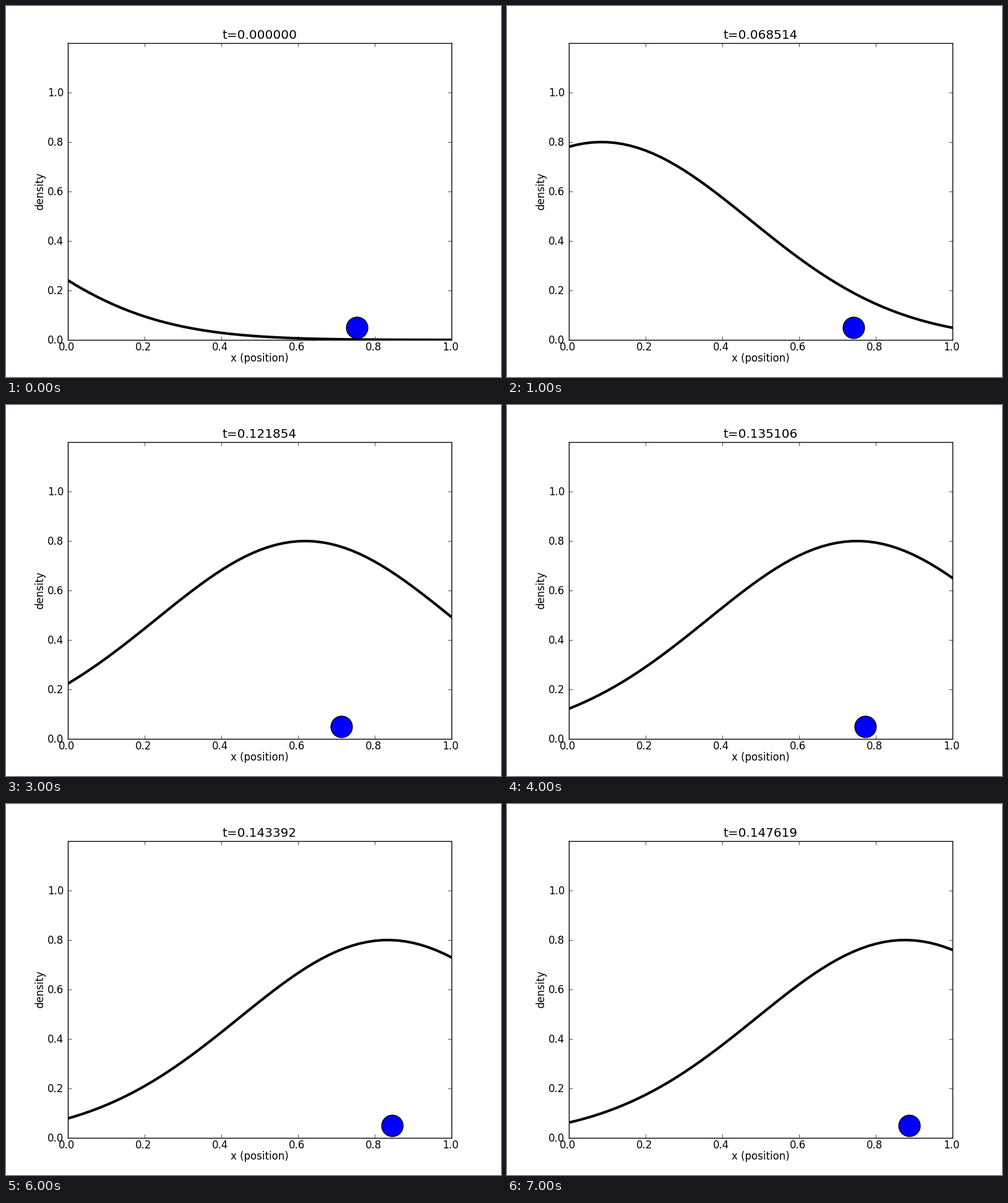
A matplotlib script that plays this animation: 800 by 600 pixels, repeating every 8 s.

```python
import numpy as np
import matplotlib.pyplot as plt
from matplotlib.animation import FuncAnimation

WIDTH, HEIGHT, DPI = 800, 600, 100
LEFT, RIGHT, TOP, BOTTOM = 100, 720, 60, 540
Y_MAX = 1.2

# One (time, ball position) pair per event of the random walk.
EVENTS = [
    (0.0, 0.7525), (0.068514, 0.7425), (0.081931, 0.7325),
    (0.121854, 0.7125), (0.135106, 0.7722), (0.139165, 0.8025),
    (0.143392, 0.8450), (0.147619, 0.8875),
]

plt.rcParams.update({"font.family": "DejaVu Sans", "font.size": 12})

fig = plt.figure(figsize=(WIDTH / DPI, HEIGHT / DPI), dpi=DPI, facecolor="white")
ax = fig.add_axes([LEFT / WIDTH, 1 - BOTTOM / HEIGHT,
                   (RIGHT - LEFT) / WIDTH, (BOTTOM - TOP) / HEIGHT])
ax.set(xlim=(0, 1), ylim=(0, Y_MAX))
ticks = np.arange(6) / 5
ax.set_xticks(ticks)
ax.set_yticks(ticks)
ax.tick_params(direction="in", length=4, width=0.5, top=True, right=True,
               labelbottom=False, labelleft=False)
for spine in ax.spines.values():
    spine.set_linewidth(1.0)


def label(x, y, text, ha="center", **style):
    """Put text with its baseline at a pixel counted from the top left."""
    return fig.text(x / WIDTH, 1 - y / HEIGHT, text, ha=ha, va="baseline", **style)


for v in ticks:
    label(LEFT + v * (RIGHT - LEFT) - 1.5, 557, f"{v:.1f}")
    label(93.5, BOTTOM - v / Y_MAX * (BOTTOM - TOP) + 6, f"{v:.1f}", ha="right")
label(410, 575, "x (position)")
fig.text(60 / WIDTH, 1 - 299 / HEIGHT, "density", rotation=90,
         rotation_mode="anchor", ha="center", va="baseline")
title = label(410, 53, "", fontsize=14.4)

x = np.linspace(0, 1, 51)
curve, = ax.plot([], [], color="black", lw=3)
ball, = ax.plot([], [], "o", ms=25, mfc="blue", mec="black", mew=1.0)


def density(t):
    """Gaussian pulse travelling right at speed 10."""
    centre = 10 * t - 0.6
    return 0.8 * np.exp(-(x - centre) ** 2 / 0.3)


def draw(i):
    t, pos = EVENTS[i]
    title.set_text(f"t={t:.6f}")
    curve.set_data(x, density(t))
    ball.set_data([pos], [0.05])
    return title, curve, ball


anim = FuncAnimation(fig, draw, frames=len(EVENTS), interval=1000,
                     repeat=True, repeat_delay=0, blit=False)
plt.show()
```
